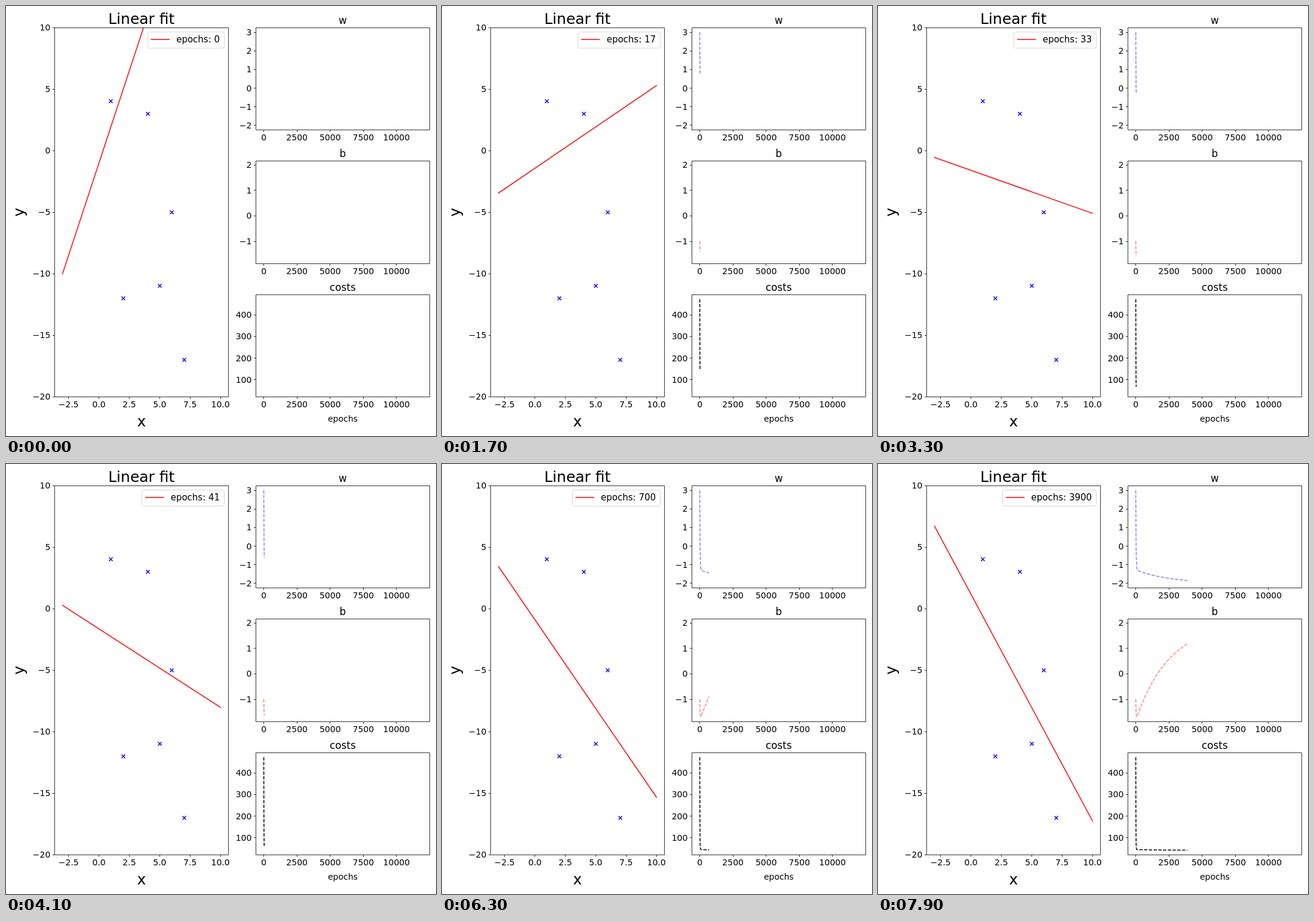
Write an HTML page that moves like this. It is 720 px wide and 720 px high and loops after 8 s.

```html
<!DOCTYPE html>
<html lang="en">
<head>
<meta charset="utf-8">
<title>Linear fit</title>
<style>
  html, body { margin: 0; width: 100%; height: 100%; overflow: hidden; background: #fff; }
  svg { display: block; width: 720px; height: 720px; font-family: "DejaVu Sans", sans-serif; }
  .axis { fill: none; stroke: #000; stroke-width: .8; }
  .line { fill: none; stroke: #f00; stroke-width: 1.5; stroke-linecap: square; }
  .marks { fill: none; stroke: #00f; stroke-width: 1.5; }
  .curve { fill: none; stroke-width: 1.5; stroke-dasharray: 5.55 2.4; stroke-linejoin: round; }
  .box { fill: #fff; fill-opacity: .8; stroke: #ccc; stroke-opacity: .8; }
</style>
</head>
<body>
<svg id="stage" viewBox="0 0 720 720"></svg>
<script>
const stage = document.getElementById('stage');
const STEP_MS = 100, STEPS = 80, LAST = 11900, RATE = 0.002;
const points = [[1, 4], [2, -12], [4, 3], [5, -11], [6, -5], [7, -17]];

function add(tag, attrs, content) {
  const el = document.createElementNS('http://www.w3.org/2000/svg', tag);
  for (const key in attrs) el.setAttribute(key, attrs[key]);
  if (content !== undefined) el.textContent = content;
  return stage.appendChild(el);
}
const text = (s, x, y, size, anchor = 'middle') =>
  add('text', { x, y, 'font-size': size, 'text-anchor': anchor }, s);
const snap = v => Math.floor(v) + 0.5;
const label = (v, digits) => v.toFixed(digits).replace('-', '\u2212');

// Gradient descent on the mean squared error
function train() {
  const ws = [], bs = [], costs = [];
  let w = 3, b = -1;
  for (let n = 0; n <= LAST; n++) {
    let cost = 0, dw = 0, db = 0;
    for (const [x, y] of points) {
      const r = w * x + b - y;
      cost += r * r / points.length;
      dw += r * x / points.length;
      db += r / points.length;
    }
    ws.push(w); bs.push(b); costs.push(cost);
    w -= RATE * dw;
    b -= RATE * db;
  }
  return { ws, bs, costs };
}

function makeAxes(left, top, width, height, [x0, x1], [y0, y1]) {
  return {
    left, top, width, height,
    x: v => left + (v - x0) / (x1 - x0) * width,
    y: v => top + (y1 - v) / (y1 - y0) * height
  };
}

function drawAxes(ax, xTicks, yTicks, digits) {
  const l = snap(ax.left), t = snap(ax.top);
  const r = snap(ax.left + ax.width), b = snap(ax.top + ax.height);
  let d = `M${l} ${t}H${r}V${b}H${l}Z`;
  for (const v of xTicks) {
    d += `M${snap(ax.x(v))} ${b}v3.5`;
    text(label(v, digits), ax.x(v), b + 17.5, 14);
  }
  for (const v of yTicks) {
    d += `M${l} ${snap(ax.y(v))}h-3.5`;
    text(label(v, 0), ax.left - 7, Math.round(ax.y(v) + 5), 14, 'end');
  }
  add('path', { class: 'axis', d });
}

const { ws, bs, costs } = train();

// Main plot
const main = makeAxes(81.4, 36.3, 290.9, 618.1, [-3.65, 10.65], [-20, 10]);
const clip = add('clipPath', { id: 'inside' });
clip.appendChild(add('rect', { x: main.left, y: main.top, width: main.width, height: main.height }));
const cross = ([x, y]) => {
  const cx = snap(main.x(x)), cy = snap(main.y(y));
  return `M${cx - 3} ${cy - 3}l6 6M${cx - 3} ${cy + 3}l6 -6`;
};
add('path', { class: 'marks', d: points.map(cross).join('') });
const fit = add('path', { class: 'line', 'clip-path': 'url(#inside)' });
drawAxes(main, [-2.5, 0, 2.5, 5, 7.5, 10], [10, 5, 0, -5, -10, -15, -20], 1);
text('Linear fit', 226.8, 30, 25);
text('x', 226.8, 704, 25);
text('y', 0, 0, 25).setAttribute('transform', 'translate(30 345.3) rotate(-90)');

// Legend
const box = add('rect', { class: 'box', y: 43.5, height: 27, rx: 3 });
const key = add('path', { class: 'line' });
const caption = text('', 0, 61, 15, 'start');

// History plots
function history(title, data, top, ticks, stroke, opacity) {
  const lo = Math.min(...data), hi = Math.max(...data), pad = (hi - lo) * 0.05;
  const ax = makeAxes(418.4, top, 290.9, 171.2, [-0.05 * LAST, 1.05 * LAST], [lo - pad, hi + pad]);
  const path = add('path', { class: 'curve', stroke, 'stroke-opacity': opacity });
  drawAxes(ax, [0, 2500, 5000, 7500, 10000], ticks, 0);
  text(title, 563.9, Math.floor(top - 6), 16.8);
  return count => {
    let d = '';
    const put = n => { d += `${d ? 'L' : 'M'}${ax.x(n).toFixed(2)} ${ax.y(data[n]).toFixed(2)}`; };
    for (let n = 0; n < count - 1; n += n < 200 ? 1 : 10) put(n);
    if (count > 1) put(count - 1);
    path.setAttribute('d', d);
  };
}
const curves = [
  history('w', ws, 36.3, [3, 2, 1, 0, -1, -2], '#00f', 0.5),
  history('b', bs, 259.8, [2, 1, 0, -1], '#f00', 0.5),
  history('costs', costs, 483.2, [400, 300, 200, 100], '#000', 1)
];
text('epochs', 563.9, 696, 14);

// Epochs advance by 1, then 5, then 200 per step
function epochAt(step) {
  if (step <= 50) return step;
  if (step <= 60) return 50 + (step - 50) * 5;
  return 100 + (step - 60) * 200;
}

function draw(step) {
  const n = epochAt(step), w = ws[n], b = bs[n];
  const end = x => `${main.x(x)} ${main.y(w * x + b)}`;
  fit.setAttribute('d', `M${end(-3)}L${end(10)}`);

  const start = 285.2 - (String(n).length - 1) * 9.54;
  const left = snap(start - 48);
  caption.textContent = 'epochs: ' + n;
  caption.setAttribute('x', start);
  key.setAttribute('d', `M${start - 42} 56h30`);
  box.setAttribute('x', left);
  box.setAttribute('width', 365.5 - left);
  curves.forEach(update => update(n));
}

let shown = -1;
const begin = performance.now();
function tick() {
  const step = Math.floor(Math.max(0, performance.now() - begin) / STEP_MS) % STEPS;
  if (step !== shown) draw(shown = step);
  requestAnimationFrame(tick);
}
tick();
</script>
</body>
</html>
```
